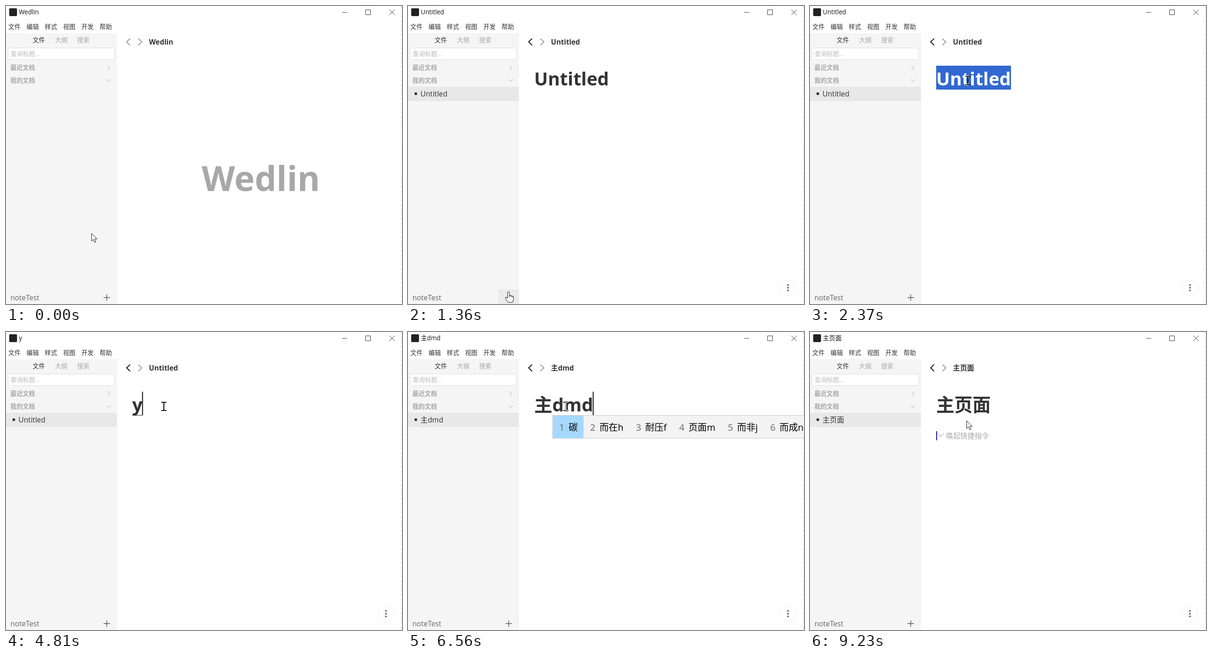
An HTML page that plays this animation: 863x649 px, repeating every 9.84 s.

```html
<!DOCTYPE html>
<html lang="zh-CN">
<head>
<meta charset="utf-8">
<title>Notes</title>
<style>
html, body { margin: 0; width: 100%; height: 100%; overflow: hidden; background: #fff; }
svg { display: block; font-family: "Open Sans", "Noto Sans CJK SC", "Noto Sans CJK", sans-serif; font-size: 13.4px; fill: #333; }
text { white-space: pre; }
.line { fill: none; stroke: #333; }
.soft { fill: #a8a8a8; }
.bold { font-weight: 700; }
.thin { fill: none; stroke: #aaa; }
.chevron { fill: none; stroke: #a4a4a4; stroke-width: 2.2; }
.cursor { fill: #fff; stroke: #111; stroke-linejoin: round; }
</style>
</head>
<body>
<svg width="863" height="649" viewBox="0 0 863 649">
  <rect width="863" height="649" fill="#fff"/>
  <rect x="7" y="5" width="17" height="17" rx="2" fill="#222"/>
  <text id="title" x="28" y="18" font-size="13.6" fill="#111"/>
  <path class="line" d="M732.5 14H743.5M783.5 8.5H794.5V19H783.5ZM835.5 8L847 19.5M847 8L835.5 19.5"/>
  <path d="M862.5 0V649" stroke="#ccc" stroke-dasharray="6 4"/>
  <g id="menu"></g>

  <rect y="59" width="242" height="590" fill="#f5f5f5"/>
  <text x="58" y="79">文件</text>
  <text class="soft" x="107" y="79">大纲</text>
  <text class="soft" x="155" y="79">搜索</text>
  <rect x="4.5" y="91.5" width="232" height="25" rx="3" fill="#fff" stroke="#ddd"/>
  <text x="10" y="109" fill="#bbb">查询标题...</text>
  <text class="soft bold" x="9.5" y="139">最近文档</text>
  <text class="soft bold" x="9.5" y="166.5">我的文档</text>
  <path class="thin" d="M221.5 129.5L227 134.5L221.5 139.5M219 159.5L224 164.5L229 159.5"/>
  <g id="row">
    <rect y="176" width="242" height="31" fill="#e8e8e8"/>
    <circle cx="17" cy="191" r="3"/>
    <text id="label" x="27.3" y="197" font-size="15.7"/>
  </g>
  <rect id="hover" x="197" y="617" width="45" height="32" fill="#ebebeb"/>
  <text x="9.7" y="641" font-size="15.7" fill="#666">noteTest</text>
  <path d="M212.5 635H226.5M219.5 628V642" stroke="#555" stroke-width="1.4"/>

  <path id="back" class="chevron" d="M270.5 71L263 78L270.5 85.5"/>
  <path class="chevron" d="M288.5 71L296 78L288.5 85.5"/>
  <text id="crumb" class="bold" x="311.5" y="84" font-size="15.4"/>
  <text id="welcome" class="soft bold" x="555.5" y="403" font-size="75" text-anchor="middle"/>

  <g id="page">
    <rect id="selection" x="275" y="130" width="163" height="52" fill="#3168d2"/>
    <text id="heading" class="bold" x="275" y="173" font-size="39.6"/>
    <rect id="underline" y="181" height="1" fill="#222"/>
    <rect id="caret" y="130" width="2" height="51" fill="#111"/>
    <circle cx="828" cy="613.5" r="17" fill="#fff" stroke="#eee"/>
    <g fill="#666">
      <circle cx="828" cy="607.5" r="1.9"/><circle cx="828" cy="613.5" r="1.9"/><circle cx="828" cy="619.5" r="1.9"/>
    </g>
    <g id="popup">
      <rect id="panel" x=".5" y="181.5" height="50" fill="#f3f3f4" stroke="#ccc"/>
      <rect x="1" y="182" width="67" height="49" fill="#a6d8ff"/>
      <text id="words" x="15" y="215" font-size="20"/>
    </g>
    <g id="prompt">
      <text class="soft" x="276.5" y="232" font-size="15.6">'=' 唤起快捷指令</text>
      <rect x="275" y="216" width="2" height="20" fill="#1d1da8"/>
    </g>
  </g>

  <path id="arrow" class="cursor" d="M.5 .5V17L4.3 13.4L7.2 20L9.9 18.8L7 12.3H12.5Z"/>
  <path id="hand" class="cursor" d="M-2 2Q-2 .5 0 .5T2 2V9Q4 7 5.5 9Q8 8 8.7 10Q11 9.5 11 12V17L9 23.5H-1L-7 14.5Q-7 12 -4.7 12L-2 14.5ZM2 8V12M5.5 9V12.5M8.7 10V13"/>
  <path id="beam" fill="none" stroke-width="2" d="M-5.5 -9H-1.5L0 -8L1.5 -9H5.5M0 -8V8M-5.5 9H-1.5L0 8L1.5 9H5.5"/>
</svg>
<script>
const LOOP = 9840, APP = 'Wedlin';
const ui = {};
document.querySelectorAll('[id]').forEach(e => ui[e.id] = e);

['文件', '编辑', '样式', '视图', '开发', '帮助'].forEach((s, i) =>
  ui.menu.innerHTML += `<text x="${5 + i * 39.8}" y="50">${s}</text>`);
ui.welcome.textContent = APP;

// Value tracks: [start time, value]
const typing = [[5790, '主'], [6090, '主d'], [6390, '主dm'], [6560, '主dmd'], [6660, '主dmdm']];
const done = '主页面';
const heading = [[0, ''], [1260, 'Untitled'], [4810, 'y'], ...typing, [6790, done]];
const title = [[0, APP], [1260, 'Untitled'], [4810, 'y'], ...typing, [7100, done]];
const crumb = [[0, APP], [1260, 'Untitled'], [5180, 'y'], ...typing, [6790, done]];
const caretOn = [[0, 0], [2270, 1], [2370, 0], [4810, 1], [5580, 0], [5790, 1],
  [7510, 0], [7850, 1], [8190, 0], [8700, 1], [9230, 0]];
const choices = [[0, ''], [5180, '主 言y 这p 话t 诉r 而且e 应该w'], [5790, ''],
  [6420, '而 页面m 耐压f 面j 而非n 碳d 而成h'],
  [6560, '碳 而在h 耐压f 页面m 而非j 而成n'], [6660, '页面'], [6790, '']];
const path = [[100, 186, 495], [540, 216, 626], [680, 216, 626], [1090, 219, 622],
  [1360, 219, 622], [2200, 344, 162], [8670, 344, 162], [8890, 341, 193]];

const at = (track, t) => track.findLast(k => k[0] <= t)[1];
const within = (t, a, b) => t >= a && t < b;
const show = (el, on) => el.style.display = on ? '' : 'none';
const move = (el, x, y) => el.setAttribute('transform', `translate(${x} ${y})`);
const write = (el, s) => { if (el.textContent !== s) el.textContent = s; };

function pointer(t) {
  const i = path.findIndex(k => k[0] > t);
  if (i === 0) return path[0].slice(1);
  if (i < 0) return path.at(-1).slice(1);
  const [t0, x0, y0] = path[i - 1], [t1, x1, y1] = path[i];
  const p = (t - t0) / (t1 - t0), e = p * p * (3 - 2 * p);
  return [x0 + (x1 - x0) * e, y0 + (y1 - y0) * e];
}

let shown = null;
function drawPopup(list) {
  show(ui.popup, list);
  if (list === shown) return;
  shown = list;
  const items = list.split(' ');
  ui.words.innerHTML = items.map((s, i) =>
    `<tspan fill="#666"${i ? ' dx="27"' : ''}>${i + 1}</tspan><tspan dx="9" fill="#000">${s}</tspan>`).join('');
  ui.panel.setAttribute('width', items.length > 1 ? 800 : 48 + 20 * items[0].length);
}

function drawText(t) {
  const text = at(heading, t), selected = within(t, 2370, 4810);
  const composing = within(t, 4810, 5790) || within(t, 6090, 6790);
  const start = text[0] === '主' ? 314.5 : 275;
  write(ui.title, at(title, t));
  write(ui.crumb, at(crumb, t));
  write(ui.label, at(crumb, Math.max(t, 1260)));
  write(ui.heading, text);
  ui.heading.setAttribute('fill', selected ? '#fff' : '#333');
  show(ui.selection, selected);

  const end = 275 + (text ? ui.heading.getComputedTextLength() : 0);
  ui.caret.setAttribute('x', t < 2370 ? 343 : end - 1);
  show(ui.caret, at(caretOn, t));
  show(ui.underline, composing);
  ui.underline.setAttribute('x', start);
  ui.underline.setAttribute('width', Math.max(0, end - start));
  drawPopup(at(choices, t));
  move(ui.popup, start, 0);
}

function drawPointer(t) {
  const [x, y] = pointer(t);
  const hand = y > 617 && x > 197 && x < 242;
  const beam = y > 130 && y < 182 && x > 275;
  show(ui.hover, hand);
  show(ui.hand, hand);
  show(ui.beam, beam);
  show(ui.arrow, !hand && !beam);
  [ui.hand, ui.beam, ui.arrow].forEach(el => move(el, x, y));
  // The text cursor inverts what lies under it
  const selected = within(t, 2370, 4810);
  ui.beam.style.mixBlendMode = selected ? 'normal' : 'difference';
  ui.beam.setAttribute('stroke', selected ? '#111' : '#fff');
}

function frame() {
  const t = performance.now() % LOOP, open = t >= 1260;
  show(ui.welcome, !open);
  show(ui.page, open);
  show(ui.row, t >= 1090);
  show(ui.prompt, t >= 9230);
  ui.back.style.stroke = open ? '#222' : '';
  drawText(t);
  drawPointer(t);
  requestAnimationFrame(frame);
}
frame();
</script>
</body>
</html>
```
